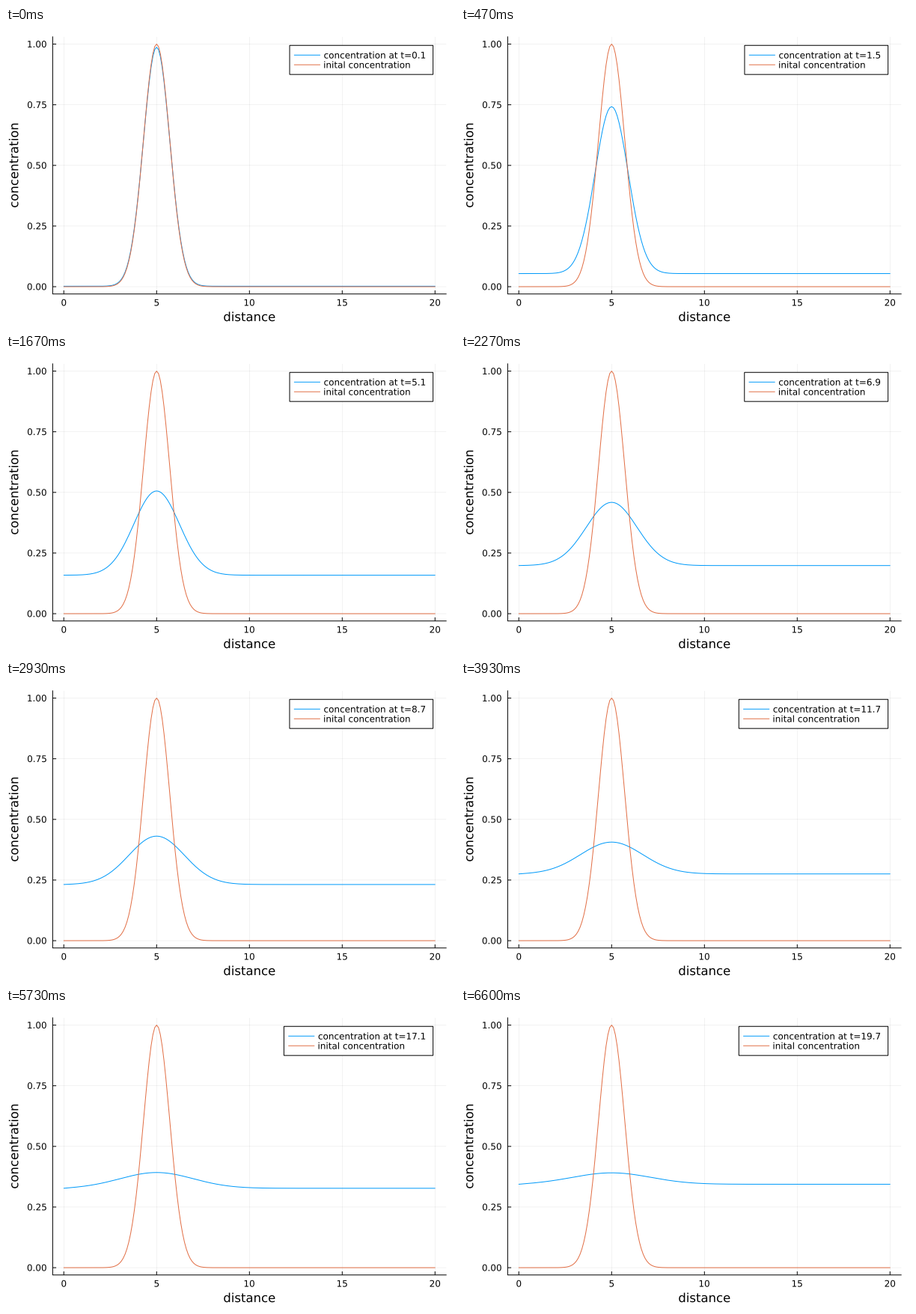
These frames come from a looping animation (600 px wide and 400 px high, 6670 ms). A matplotlib script:

```python
import numpy as np
import matplotlib.pyplot as plt
from matplotlib.animation import FuncAnimation
from matplotlib.patches import PathPatch, Rectangle
from matplotlib.textpath import TextPath
from matplotlib.transforms import Affine2D

plt.rcParams["font.family"] = "DejaVu Sans"
plt.rcParams["path.snap"] = False

FRAMES, LOOP_MS = 100, 6670
PX = 0.72  # points per pixel at 100 dpi
BLUE, ORANGE = "#009afa", "#e26f46"

# plot area in pixels, y pointing down
LEFT, RIGHT, TOP, BOTTOM = 62.386, 588.19, 11.811, 355.795
WIDTH, HEIGHT = RIGHT - LEFT, BOTTOM - TOP
LEGEND_RIGHT, LEGEND_TOP = RIGHT - WIDTH / 30, TOP + HEIGHT / 30
LEGEND_H, ROW = 38.88, 12.96
TEXT_RIGHT, TEXT_GAP = 560.1, 46.2

# diffusion with exchange towards a constant level
DIFFUSION, RATE, LEVEL, CENTRE = 0.1, 0.1, 0.4, 5
x = np.linspace(0, 20, 201)


def to_x(v):
    return LEFT + WIDTH * (v / 20 + 0.03) / 1.06


def to_y(v):
    return BOTTOM - HEIGHT * (v + 0.03) / 1.06


def concentration(t):
    spread = 1 + 4 * DIFFUSION * t
    bump = np.exp(-(x - CENTRE) ** 2 / spread) - np.exp(-(x + CENTRE) ** 2 / spread)
    decay = np.exp(-RATE * t)
    return LEVEL * (1 - decay) + decay * bump / np.sqrt(spread)


def text_path(s, px, left, base, align=0.0, angle=0):
    """Outline of s whose ink starts at left, shifted by align times its width."""
    path = TextPath((0, 0), s, size=px)
    ink = path.get_extents()
    move = Affine2D().translate(-ink.x0 - align * ink.width, 0).scale(1, -1)
    return move.rotate_deg(angle).translate(left, base).transform_path(path)


fig = plt.figure(figsize=(6, 4), dpi=100, facecolor="white")
ax = fig.add_axes([0, 0, 1, 1])
ax.set(xlim=(0, 600), ylim=(400, 0))
ax.axis("off")


def add_line(xs, ys, color="black", width=1.0, z=2, **kw):
    return ax.plot(xs, ys, color=color, lw=width * PX, zorder=z, **kw)[0]


def add_text(*args, z=6):
    patch = PathPatch(text_path(*args), fc="black", lw=0, zorder=z)
    return ax.add_patch(patch)


def add_curve(values, color, z):
    return add_line(to_x(x), to_y(values), color, z=z,
                    solid_capstyle="round", solid_joinstyle="round")


# grid, ticks and tick labels
TICK = 4.72
for v in range(0, 21, 5):
    px = to_x(v)
    add_line([px, px], [TOP, BOTTOM], width=0.5, z=1, alpha=0.1, solid_capstyle="butt")
    add_line([px, px], [BOTTOM, BOTTOM - TICK], solid_capstyle="butt")
    add_text(str(v), 12, px, 371.6, 0.5)
for v in np.linspace(0, 1, 5):
    py = to_y(v)
    add_line([LEFT, RIGHT], [py, py], width=0.5, z=1, alpha=0.1, solid_capstyle="butt")
    add_line([LEFT, LEFT + TICK], [py, py], solid_capstyle="butt")
    add_text(f"{v:.2f}", 12, 53.8, py + 4.37, 1.0)
add_line([LEFT, LEFT, RIGHT], [TOP, BOTTOM, BOTTOM])
add_text("distance", 16.5, (LEFT + RIGHT) / 2, 392.1, 0.5)
add_text("concentration", 16.5, 16.3, (TOP + BOTTOM) / 2, 0.5, -90)

current = add_curve(concentration(0), BLUE, 3)
add_curve(np.exp(-(x - CENTRE) ** 2), ORANGE, 4)

# legend, laid out anew for every label width
box = ax.add_patch(Rectangle((0, LEGEND_TOP), 1, LEGEND_H, fc="white",
                             ec="black", lw=PX, zorder=5))
rows = [LEGEND_TOP + ROW, LEGEND_TOP + 2 * ROW]
keys = [add_line([0, 1], [y, y], c, z=6, solid_capstyle="butt")
        for y, c in zip(rows, (BLUE, ORANGE))]
names = [add_text("c", 12, 0, y + 4.37) for y in rows]


def update(i):
    label = 0.1 + 0.2 * i
    current.set_ydata(to_y(concentration(label - 0.05)))

    title = text_path(f"concentration at t={label:.1f}", 12,
                      TEXT_RIGHT, rows[0] + 4.37, 1.0)
    start = title.get_extents().x0
    left = start - TEXT_GAP
    names[0].set_path(title)
    names[1].set_path(text_path("inital concentration", 12, start, rows[1] + 4.37))
    box.set_x(left)
    box.set_width(LEGEND_RIGHT - left)
    key = left + WIDTH / 90
    for k in keys:
        k.set_xdata([key, key + WIDTH / 15])
    return [current, box, *keys, *names]


anim = FuncAnimation(fig, update, frames=FRAMES, init_func=lambda: update(0),
                     interval=LOOP_MS / FRAMES, repeat=True, repeat_delay=0)
plt.show()
```
